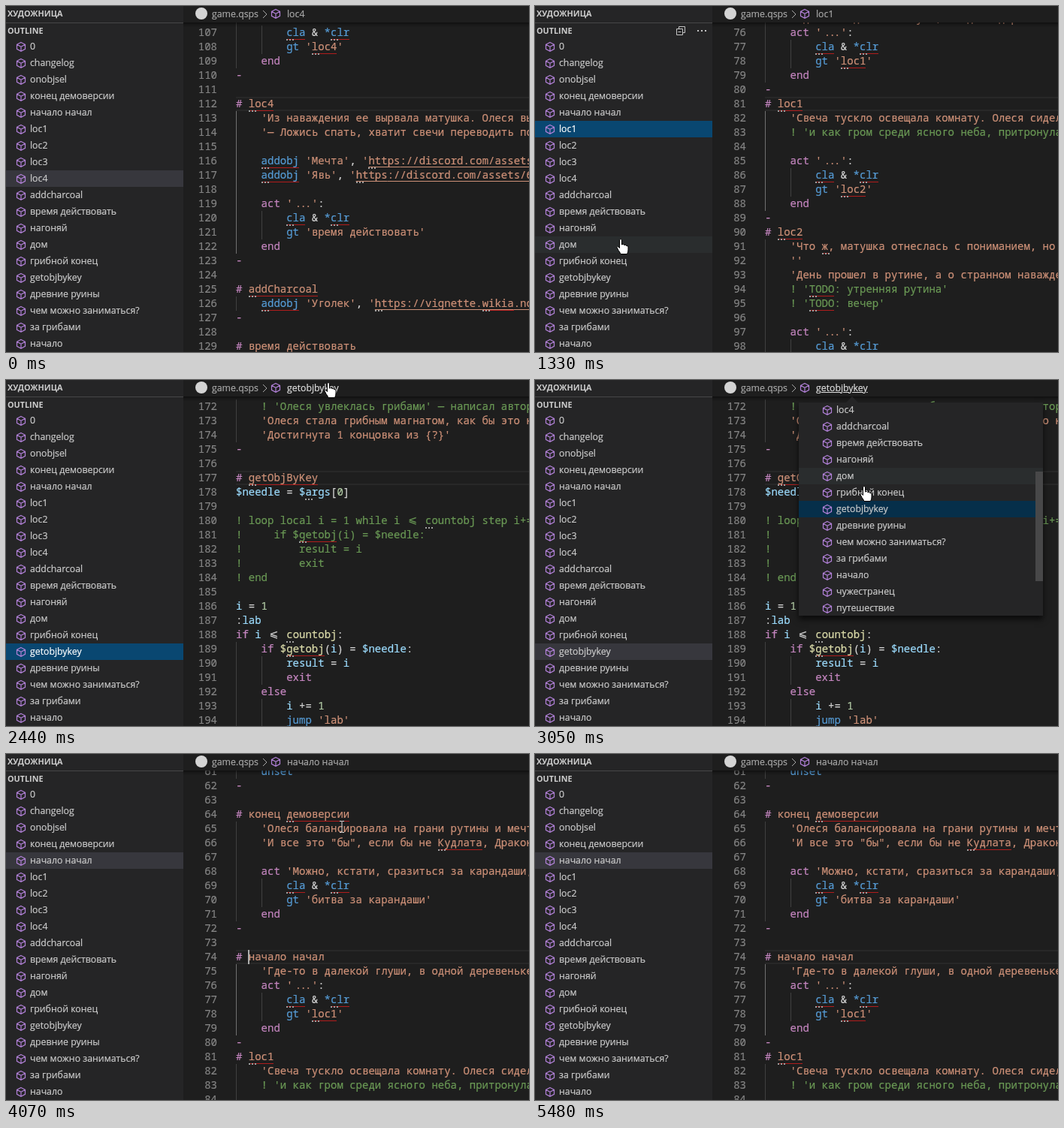
An HTML page that plays this animation: 696x461 px, repeating every 5.56 s.

```html
<!DOCTYPE html>
<html lang="ru">
<head>
<meta charset="utf-8">
<style>
html, body { margin: 0; width: 100%; height: 100%; overflow: hidden; background: #1e1e1e; }
body { position: relative; font: 12.3px/22px "Open Sans", "Noto Sans", sans-serif; color: #ccc; white-space: pre;
  -webkit-text-stroke: .2px; }
div, svg { position: absolute; }
#side { left: 0; top: 0; width: 236px; height: 461px; background: #252526; overflow: hidden; }
.head { left: 2px; font-size: 10.8px; font-weight: 700; -webkit-text-stroke: 0; }
.row { left: 0; width: 100%; height: 22px; }
.row span { position: absolute; left: 32px; top: 0; }
.row svg { left: 13px; top: 4px; }
.cube { fill: none; stroke: #b180d7; stroke-width: 1.2; }
.hover { background: #2a2d2e; }
.sel { background: #37373d; }
.focus { background: #094771; color: #fff; }
.focus .cube { stroke: #fff; }
#crumbs { left: 236px; top: 0; width: 460px; height: 22px; color: #a9a9a9; }
#crumbs div { top: 0; }
#crumbs #logo { left: 16px; top: 2px; width: 16px; height: 16px; border-radius: 50%; background: #d4d4d4; }
#crumbs svg { left: 100px; top: 3px; }
#crumb { left: 138px; }
#crumb.lit { color: #e0e0e0; }
#crumb.open { text-decoration: underline; }
#editor { left: 236px; top: 22px; width: 460px; height: 439px; overflow: hidden; color: #d4d4d4;
  font: 14px/19px "Noto Sans Mono", "DejaVu Sans Mono", monospace; }
#shade { left: 0; top: 0; width: 100%; height: 6px; box-shadow: #000 0 6px 6px -6px inset; }
.line { left: 0; width: 460px; height: 19px; }
.num { top: -1px; width: 45px; text-align: right; color: #858585; }
.text { top: -1px; left: 70px; }
.guide { width: 1px; height: 19px; background: #404040; }
.scope .guide.first { background: #707070; }
.current::before { content: ""; position: absolute; left: 70px; right: 0; height: 15px; border: solid #282828; border-width: 2px 0; }
#caret { left: 86px; width: 2px; height: 19px; background: #aeafad; }
b { font-weight: 400; }
.s { color: #ce9178; } .k { color: #c586c0; } .b { color: #569cd6; } .f { color: #dcdcaa; }
.v { color: #9cdcfe; } .n { color: #b5cea8; } .c { color: #6a9955; }
.text i { font-style: normal; letter-spacing: -1.8px; padding: 0 2.2px 0 3.2px; }
.text s { text-decoration: underline 1px; text-underline-offset: 3px; }
.text q { quotes: none; display: inline-block; width: 2ch; text-align: center; line-height: 18px; vertical-align: top; }
u, em { position: relative; font-style: normal; text-decoration: none; }
u::before { content: ""; position: absolute; left: 0; right: 0; bottom: -1px; height: 1px; background: #b01c1c; }
u::after, em::after { content: ""; position: absolute; left: 0; bottom: -2px; width: 10px; height: 2px;
  background: linear-gradient(90deg, #a0a0a0 2px, #0000 2px) 0 0 / 4px 2px; }
#picker { left: 351px; top: 30px; width: 325px; height: 284px; background: #252526; box-shadow: 0 5px 8px #000a; }
#arrow { left: 63px; top: -8px; border: 8px solid #0000; border-top: 0; border-bottom-color: #252526; }
#clip { left: 0; top: 0; width: 100%; height: 100%; overflow: hidden; }
#list { left: 0; top: 0; width: 100%; }
#list .row span { left: 50px; }
#list .row svg { left: 31px; }
#list .sel { background: #062f4a; }
#thumb { right: 0; width: 10px; height: 146px; background: #484849; }
#mouse { left: 0; top: 0; overflow: visible; }
</style>
</head>
<body>
<div id="editor"><div id="code"></div><div id="shade"></div></div>
<div id="crumbs"><div id="logo"></div><div style="left:38px">game.qsps</div>
<svg width="40" height="16" fill="none" stroke="#a9a9a9"><path d="M6 3l5 5l-5 5"/><use href="#cube" x="16"/></svg>
<div id="crumb"></div></div>
<div id="side"><div class="head" style="top:-1px">ХУДОЖНИЦА</div>
<div style="top:22px;width:236px;height:1px;background:#464647"></div>
<div class="head" style="top:22px">OUTLINE</div>
<svg id="tools" style="left:187px;top:26px" width="46" height="14" fill="none" stroke="#c5c5c5">
<path d="M4.5 4V1.5h8v8H10M1.5 4.5h8v8h-8zM3.5 8.5h4"/><path d="M29 7h2m3 0h2m3 0h2" stroke-width="2"/></svg>
</div>
<div id="picker"><div id="arrow"></div><div id="clip"><div id="list"></div><div id="thumb"></div></div></div>
<svg id="mouse" width="1" height="1">
<defs><path id="cube" class="cube" d="M7 1.5l5.5 2.8v6L7 13.2l-5.5-2.9v-6zM1.5 4.3L7 7.2l5.5-2.9M7 7.2v6"/></defs>
<path id="hand" fill="#fff" stroke="#000" d="M-1.5 1.5Q0-.5 1.5 1.5V8Q4 6.5 4.5 8.5 7 7.5 7.5 9.5 10 9 10 11V15Q10 18 8.5 20.5H0Q-1 18-3 15.5L-5 11.5Q-4.5 9.5-2.8 11L-1.5 12.5z"/>
<path id="beam" fill="none" stroke="#ddd" d="M-3-7.5h2.5l.5.5.5-.5H3M0-7V7M-3 7.5h2.5L0 7l.5.5H3"/></svg>
<script>
const $ = id => document.getElementById(id);
const items = `0,changelog,onobjsel,конец демоверсии,начало начал,loc1,loc2,loc3,loc4,addcharcoal,время действовать,нагоняй,дом,грибной конец,getobjbykey,древние руины,чем можно заниматься?,за грибами,начало,чужестранец,путешествие`.split(',');

const step = to => `    act '...':
        cla & *clr
        gt '${to}'
    end`;

// Visible parts of the file, keyed by their first line number
const parts = {
61: `    unset
-

# конец демоверсии
    'Олеся балансировала на грани рутины и мечты,
    'И все это "бы", если бы не Кудлата, Дракон и

    act 'Можно, кстати, сразиться за карандаши, да':
        cla & *clr
        gt 'битва за карандаши'
    end
-

# начало начал
    'Где-то в далекой глуши, в одной деревеньке,
${step('loc1')}
-
# loc1
    'Свеча тускло освещала комнату. Олеся сидела
    ! 'и как гром среди ясного неба, притронулась

${step('loc2')}
-
# loc2
    'Что ж, матушка отнеслась с пониманием, но
    ''
    'День прошел в рутине, а о странном наваждении
    ! 'TODO: утренняя рутина'
    ! 'TODO: вечер'

${step('loc3')}`,
106: `${step('loc4')}
-

# loc4
    'Из наваждения ее вырвала матушка. Олеся выронила
    '— Ложись спать, хватит свечи переводить попусту

    addobj 'Мечта', 'https://discord.com/assets/0'
    addobj 'Явь', 'https://discord.com/assets/6'

${step('время действовать')}
-

# addCharcoal
    addobj 'Уголек', 'https://vignette.wikia.nocookie'
-

# время действовать`,
145: `${step('дом')}
-
# дом
    'Олеся вернулась домой и села у окна.
    ''
${step('чем можно заниматься?')}

    act 'За грибами':
        cla & *clr
        gt 'за грибами'
    end
-

# грибной конец
    'Корзина была полна грибов, и день удался.

${step('начало')}`,
172: `    ! 'Олеся увлеклась грибами' — написал автор
    'Олеся стала грибным магнатом, как бы это ни
    'Достигнута 1 концовка из {?}'
-

# getObjByKey
$needle = $args[0]

! loop local i = 1 while i <= countobj step i+=1:
!     if $getobj(i) = $needle:
!         result = i
!         exit
! end

i = 1
:lab
if i <= countobj:
    if $getobj(i) = $needle:
        result = i
        exit
    else
        i += 1
        jump 'lab'
    end`
};

const mark = s => s
  .replace(/https:[^\s']+/, '<s>$&</s>')
  .replace(/\.{3}/, '<i>...</i>')
  .replace(/\b(?:cla|clr|loc\d|addobj|addCharcoal|getObjByKey|getobj|wikia|TODO)\b|демоверсии|Кудлата|(?<= )ж(?=,)/g, '<u>$&</u>')
  .replace(/\b(?:args|countobj|https)\b/g, '<em>$&</em>');
const tint = (cls, s) => `<b class="${cls}">${mark(s)}</b>`;
const tokens = /('[^']*'?)|(\b(?:act|end|if|else|exit)\b|^-)|(\b(?:addobj|cla|gt|jump|unset)\b|\*clr)|(countobj|\$getobj)|(\$?[a-z]+)|(\d+)/g;
function paint(s) {
  const html = /^\s*!/.test(s) ? tint('c', s)
    : s[0] == '#' ? tint('k', '#') + tint('s', s.slice(1))
    : s.replace(tokens, (m, ...g) => tint('skbfvn'[g.findIndex(Boolean)], m));
  return html.replace('<=', '<q>⩽</q>');
}

const rows = {}, depth = {};
for (const start in parts) {
  const lines = parts[start].split('\n');
  const level = i => lines[i] ? lines[i].search(/\S/) / 4 : 0;
  lines.forEach((s, i) => {
    const n = +start + i, row = document.createElement('div');
    depth[n] = s ? level(i) : Math.min(level(i - 1), level(i + 1));
    let guides = '';
    for (let k = 0; k < depth[n]; k++)
      guides += `<div class="guide ${k ? '' : 'first'}" style="left:${70 + k * 33.6}px"></div>`;
    row.className = 'line';
    row.style.top = n * 19 + 'px';
    row.innerHTML = `<div class="num">${n}</div>${guides}<div class="text">${paint(s)}</div>`;
    $('code').append(row);
    rows[n] = row;
  });
}
const caret = document.createElement('div');
caret.id = 'caret';
$('code').append(caret);

function addRows(box, top) {
  return items.map((name, i) => {
    const row = document.createElement('div');
    row.style.top = top + i * 22 + 'px';
    row.innerHTML = `<svg width="14" height="15"><use href="#cube"/></svg><span>${name}</span>`;
    box.append(row);
    return row;
  });
}
const sideRows = addRows($('side'), 43), pickRows = addRows($('list'), 0);

// time, selected item, its line, top of that line
const visits = [[0, 8, 112, 121], [860, 5, 81, 121], [1490, 12, 150, 121], [1970, 14, 177, 121], [3840, 4, 74, 261]];
const path = [[70, 584, 452], [620, 108, 185], [780, 104, 171], [1020, 104, 172], [1330, 114, 310],
  [1730, 116, 318], [1890, 112, 360], [2050, 112, 360], [2430, 431, 1], [2600, 432, 5], [2900, 437, 132],
  [3050, 438, 141], [3290, 462, 160], [3450, 470, 162], [3600, 391, 112], [3680, 428, 130], [3840, 430, 130],
  [4070, 447, 97], [4390, 447, 97], [4930, 662, 450], [5090, 665, 461], [5170, 667, 480]];
const scrolls = [[3060, 177], [3290, 0]];
const LOOP = 5560, TICK = LOOP / 71;

function along(keys, t) {
  const i = keys.findIndex(k => k[0] > t);
  if (i < 0) return keys.at(-1).slice(1);
  if (!i) return keys[0].slice(1);
  const a = keys[i - 1], b = keys[i], p = (t - a[0]) / (b[0] - a[0]);
  return a.slice(1).map((v, j) => v + (b[j + 1] - v) * p);
}
const show = (el, on) => { el.style.display = on ? '' : 'none'; };

let shown;
function visit(v) {
  if (shown == v) return;
  shown = v;
  const [, item, line, top] = v;
  for (const n in rows) rows[n].className = 'line';
  rows[line].classList.add('current');
  for (let n = line + 1; depth[n] > 0; n++) rows[n].classList.add('scope');
  $('code').style.top = top - 22 - line * 19 + 'px';
  caret.style.top = line * 19 + 'px';
  $('crumb').textContent = items[item];
}

function draw(now) {
  const t = now % LOOP;
  const tick = Math.floor((t + 9) / TICK) * TICK;
  const [x, y] = along(path, tick);
  const v = visits.findLast(k => k[0] <= t);
  const present = t >= 70 && t < 5170, open = t >= 2600 && t < 3840;
  const inSide = present && x < 236, onCrumb = present && !inSide && y < 22;
  const focus = t >= 780 && t < 2600;
  const [scroll] = along(scrolls, tick);
  visit(v);

  const style = (list, hover, cls) => list.forEach((row, i) => {
    row.className = 'row ' + (i == v[1] ? cls : i == hover ? 'hover' : '');
  });
  style(sideRows, inSide ? Math.floor((y - 46) / 22) : -1, focus ? 'focus' : 'sel');
  style(pickRows, y > 33 ? Math.floor((y - 33 + scroll) / 22) : -1, '');
  pickRows[14].classList.add('sel');

  show($('tools'), inSide);
  show($('picker'), open);
  $('list').style.top = -scroll + 'px';
  $('thumb').style.top = 92 * scroll / 177 + 'px';
  $('crumb').className = onCrumb || open ? open ? 'lit open' : 'lit' : '';
  show(caret, t >= 3840 && t < 4470 || t >= 5010 && t < 5480);

  const hand = inSide || onCrumb || open;
  show($('mouse'), present);
  show($('hand'), hand);
  show($('beam'), !hand);
  $('mouse').style.transform = `translate(${Math.round(x)}px,${Math.round(y)}px)`;
}
const start = performance.now();
function loop() {
  draw(performance.now() - start);
  requestAnimationFrame(loop);
}
loop();
</script>
</body>
</html>
```
